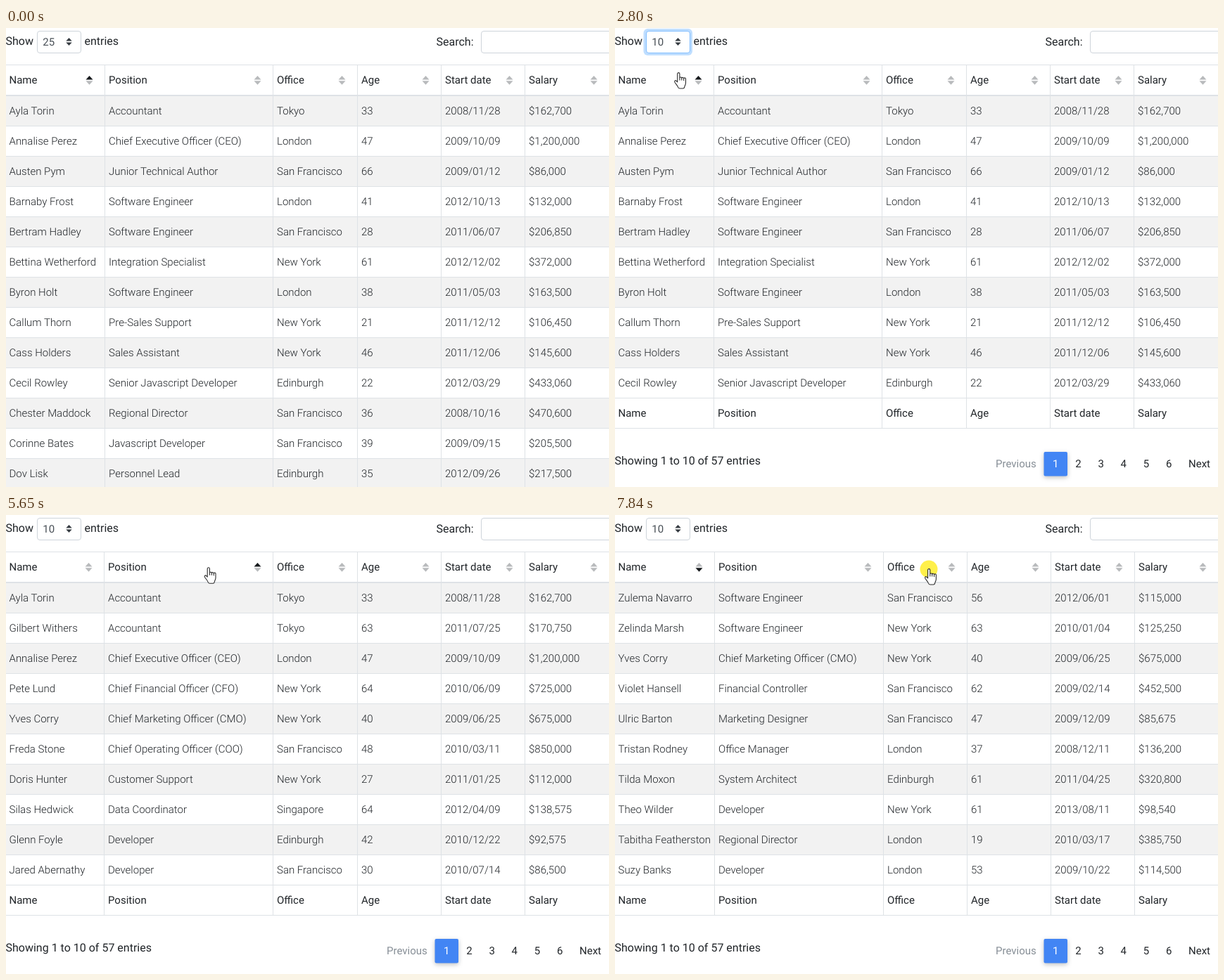
These frames come from a looping animation (857x653 px, 8000 ms). An HTML page:

```html
<!DOCTYPE html>
<html lang="en">
<head>
<meta charset="utf-8">
<title>Sortable table</title>
<style>
  html, body { margin: 0; width: 100%; height: 100%; overflow: hidden; background: #fff; }
  svg { display: block; font: 400 15px Roboto, sans-serif; fill: #212529; text-rendering: geometricPrecision; }
  text { white-space: pre; }
  .cell { font-weight: 300; }
  .big { font-size: 16px; }
  .field { fill: #fff; stroke: #ced4da; }
  .input { fill: #495057; }
  .muted { fill: #868e96; }
  .page { filter: drop-shadow(0 2px 3px rgba(0,0,0,.25)); }
  .menu { filter: drop-shadow(0 1px 2px rgba(0,0,0,.4)); }
</style>
</head>
<body>
<svg id="stage" width="857" height="653" viewBox="0 0 857 653"></svg>
<script>
const LOOP = 8000;
const HEADS = ['Name', 'Position', 'Office', 'Age', 'Start date', 'Salary'];
const ROWS = `Ayla Torin|Accountant|Tokyo|33|2008/11/28|$162,700
Annalise Perez|Chief Executive Officer (CEO)|London|47|2009/10/09|$1,200,000
Austen Pym|Junior Technical Author|San Francisco|66|2009/01/12|$86,000
Barnaby Frost|Software Engineer|London|41|2012/10/13|$132,000
Bertram Hadley|Software Engineer|San Francisco|28|2011/06/07|$206,850
Bettina Wetherford|Integration Specialist|New York|61|2012/12/02|$372,000
Byron Holt|Software Engineer|London|38|2011/05/03|$163,500
Callum Thorn|Pre-Sales Support|New York|21|2011/12/12|$106,450
Cass Holders|Sales Assistant|New York|46|2011/12/06|$145,600
Cecil Rowley|Senior Javascript Developer|Edinburgh|22|2012/03/29|$433,060
Chester Maddock|Regional Director|San Francisco|36|2008/10/16|$470,600
Corinne Bates|Javascript Developer|San Francisco|39|2009/09/15|$205,500
Dov Lisk|Personnel Lead|Edinburgh|35|2012/09/26|$217,500
Gilbert Withers|Accountant|Tokyo|63|2011/07/25|$170,750
Pete Lund|Chief Financial Officer (CFO)|New York|64|2010/06/09|$725,000
Yves Corry|Chief Marketing Officer (CMO)|New York|40|2009/06/25|$675,000
Freda Stone|Chief Operating Officer (COO)|San Francisco|48|2010/03/11|$850,000
Doris Hunter|Customer Support|New York|27|2011/01/25|$112,000
Silas Hedwick|Data Coordinator|Singapore|64|2012/04/09|$138,575
Glenn Foyle|Developer|Edinburgh|42|2010/12/22|$92,575
Jared Abernathy|Developer|San Francisco|30|2010/07/14|$86,500
Zulema Navarro|Software Engineer|San Francisco|56|2012/06/01|$115,000
Zelinda Marsh|Software Engineer|New York|63|2010/01/04|$125,250
Violet Hansell|Financial Controller|San Francisco|62|2009/02/14|$452,500
Ulric Barton|Marketing Designer|San Francisco|47|2009/12/09|$85,675
Tristan Rodney|Office Manager|London|37|2008/12/11|$136,200
Tilda Moxon|System Architect|Edinburgh|61|2011/04/25|$320,800
Theo Wilder|Developer|New York|61|2013/08/11|$98,540
Tabitha Featherston|Regional Director|London|19|2010/03/17|$385,750
Suzy Banks|Developer|London|53|2009/10/22|$114,500`.split('\n').map(r => r.split('|'));

const ASC = [-1.5, 140, 379, 499, 618, 737, 857];
const VIEWS = {
  long: { rows: ROWS.slice(0, 13), edges: ASC, sort: 0, dir: 'up' },
  name: { rows: ROWS.slice(0, 10), edges: ASC, sort: 0, dir: 'up', foot: true },
  role: { rows: [ROWS[0], ROWS[13], ROWS[1], ...ROWS.slice(14, 21)],
          edges: [-1.5, 139, 379, 499, 618, 737, 857], sort: 1, dir: 'up', foot: true },
  desc: { rows: [ROWS[21], ROWS[22], ROWS[15], ...ROWS.slice(23)],
          edges: [-1.5, 141, 381, 500, 619, 738, 857], sort: 0, dir: 'down', foot: true }
};

const stage = document.getElementById('stage');
function add(parent, tag, attrs = {}, content) {
  const el = document.createElementNS('http://www.w3.org/2000/svg', tag);
  for (const k in attrs) el.setAttribute(k, attrs[k]);
  if (content !== undefined) el.textContent = content;
  parent.append(el);
  return el;
}
const rect = (p, x, y, width, height, fill, more) => add(p, 'rect', { x, y, width, height, fill, ...more });
const label = (p, x, y, s, cls = '', more) => add(p, 'text', { x, y, class: cls, ...more }, s);
const show = (el, on) => el.setAttribute('visibility', on ? 'visible' : 'hidden');

function sortIcon(p, x, dir) {
  const tint = d => d === dir ? '#16191c' : '#b8babc';
  add(p, 'path', { d: `M${x - 5} 73.5l5-5.5 5 5.5z`, fill: tint('up') });
  add(p, 'path', { d: `M${x - 5} 75.3l5 5.5 5-5.5z`, fill: tint('down') });
}

function buildView({ rows, edges, sort, dir, foot }) {
  const g = add(stage, 'g');
  const line = '#dee2e6';
  const bottom = foot ? 570 : 653;
  rows.forEach((row, i) => {
    const y = 97 + 43 * i;
    if (i % 2 === 0) rect(g, 0, y, 857, 42, '#f2f2f2');
    rect(g, 0, y + 42, 857, 1, line);
    row.forEach((s, c) => label(g, edges[c] + 6, y + 26, s, 'cell'));
  });
  rect(g, 0, 52, 857, 1, line);
  rect(g, 0, 95, 857, 2, line);
  if (foot) rect(g, 0, 569, 857, 1, line);
  HEADS.forEach((s, c) => {
    if (c) rect(g, edges[c], 52, 1, bottom - 52, line);
    label(g, edges[c] + 6, 79, s);
    if (foot) label(g, edges[c] + 6, 553, s);
    sortIcon(g, edges[c + 1] - 21.5, c === sort ? dir : '');
  });
  if (foot) {
    label(g, -0.5, 621, 'Showing 1 to 10 of 57 entries', 'big');
    label(g, 541, 625, 'Previous', 'muted');
    rect(g, 609.5, 603, 33.5, 34.5, '#4285f4', { rx: 2, class: 'page' });
    for (let n = 1; n <= 6; n++)
      label(g, 594 + 32.2 * n, 625, n, '', { 'text-anchor': 'middle', fill: n === 1 ? '#fff' : '#212529' });
    label(g, 815, 625, 'Next');
  }
  return g;
}
const views = Object.fromEntries(Object.entries(VIEWS).map(([k, v]) => [k, buildView(v)]));

// Toolbar
label(stage, -0.5, 24, 'Show', 'big');
label(stage, 111.5, 24, 'entries', 'big');
label(stage, 611.5, 25, 'Search:', 'big');
add(stage, 'rect', { x: 675.5, y: 4.5, width: 200, height: 31, rx: 3.5, class: 'field' });
const glow = rect(stage, 40.5, 1, 69.5, 38, '#bfdeff', { rx: 6 });
const box = add(stage, 'rect', { x: 44.5, y: 4.5, width: 62, height: 31, rx: 3.5, class: 'field' });
const value = label(stage, 52.3, 25, '25', 'input');
add(stage, 'path', { d: 'M89.5 14l-4.2 4.5h8.4zM89.5 25l-4.2-4.5h8.4z', fill: '#343a40' });

// Drop-down list
const menu = add(stage, 'g');
rect(menu, 43.5, 39, 64, 133, '#fff', { class: 'menu' });
const mark = rect(menu, 43.5, 72, 64, 33.5, '#cecece');
['10', '25', '50', '100'].forEach((s, i) => label(menu, 52.3, 61 + 33 * i, s, 'input'));

// Pointer
const pointer = add(stage, 'g');
const halo = add(pointer, 'circle', { r: 12.5, fill: '#fff04a' });
const ink = { fill: '#fff', stroke: '#2b2b2b', 'stroke-width': 1.1, 'stroke-linejoin': 'round' };
const arrow = add(pointer, 'path', { d: 'M.5.5V17l3.8-3.6 2.7 6.3 2.6-1.1-2.7-6.1h5.2z', ...ink });
const hand = add(pointer, 'path', {
  d: 'M4.6 2.2a1.6 1.6 0 0 1 3.2 0V8a1.5 1.5 0 0 1 2.9.4a1.5 1.5 0 0 1 2.9.6a1.4 1.4 0 0 1 2.8.8V15' +
     'c0 3-1.6 4-1.8 6.2c-.2 1.4-.8 1.8-2 1.8H8c-1.2 0-2-.6-2.4-1.6C4.6 18.6 2.4 16.6.9 14.3' +
     'c-1-1.7.6-3.3 2-2.2l1.7 1.8zM4.6 13.5V10M7.8 8v3.5M10.7 8.6v3M13.6 9.2v2.8',
  transform: 'translate(-6 -1)', ...ink });

// start, end, number of steps, path
const MOVES = [
  [600, 840, 4, [[145, 4], [120, 9], [81, 21]]],
  [1470, 1620, 3, [[81, 21], [89, 58]]],
  [2800, 3600, 11, [[89, 59], [112, 150], [165, 240], [235, 267], [287, 231]]],
  [3680, 4240, 8, [[287, 231], [335, 195], [357, 130], [330, 65], [297, 31]]],
  [4390, 4860, 7, [[297, 31], [301, 55], [303, 75]]],
  [5650, 5960, 5, [[303, 75], [195, 76], [86, 76]]],
  [7280, 7760, 7, [[86, 76], [270, 81], [446, 77]]]
];
const CLICKS = [[840, 920], [1860, 1940], [5020, 5180], [6190, 6270], [6810, 6890], [7840, 8000]];
const SCENES = [[0, 'long'], [2100, 'name'], [5180, 'role'], [6360, 'name'], [6890, 'desc']];

// Catmull-Rom curve through the points
function along(pts, p) {
  const n = pts.length - 1, u = p * n, i = Math.min(n - 1, Math.floor(u)), f = u - i;
  const at = k => pts[Math.max(0, Math.min(n, k))];
  const [a, b, c, d] = [at(i - 1), at(i), at(i + 1), at(i + 2)];
  return [0, 1].map(k => b[k] + f / 2 * (c[k] - a[k]
    + f * (2 * a[k] - 5 * b[k] + 4 * c[k] - d[k] + f * (3 * (b[k] - c[k]) + d[k] - a[k]))));
}
function place(t) {
  const [from, to, steps, pts] = MOVES.filter(m => t >= m[0]).pop() || MOVES[0];
  const k = Math.floor((t - from) / (to - from) * (steps - 1) + 1e-6) + 1;
  const p = Math.max(0, Math.min(1, k / steps));
  return along(pts, p * p * (3 - 2 * p));
}

function draw(t) {
  const scene = SCENES.filter(s => t >= s[0]).pop()[1];
  for (const k in views) show(views[k], k === scene);
  const focus = t >= 1110 && t < 4860;
  show(glow, focus);
  glow.setAttribute('opacity', t < 1180 ? 0.5 : 1);
  box.style.stroke = focus ? '#80bdff' : '';
  value.textContent = t < 2100 ? '25' : '10';
  const open = t >= 920 && t < 2100;
  menu.style.display = open ? '' : 'none';
  mark.setAttribute('y', t < 1550 ? 72 : 39);

  const [x, y] = place(t);
  pointer.setAttribute('transform', `translate(${x.toFixed(1)} ${y.toFixed(1)})`);
  pointer.style.display = t < 600 ? 'none' : '';
  const overHead = !open && y > 52 && y < 96;
  show(hand, overHead);
  show(arrow, !overHead);
  show(halo, CLICKS.some(([a, b]) => t >= a && t < b));
}

const begin = performance.now();
function tick() {
  draw((performance.now() - begin) % LOOP);
  requestAnimationFrame(tick);
}
tick();
</script>
</body>
</html>
```
